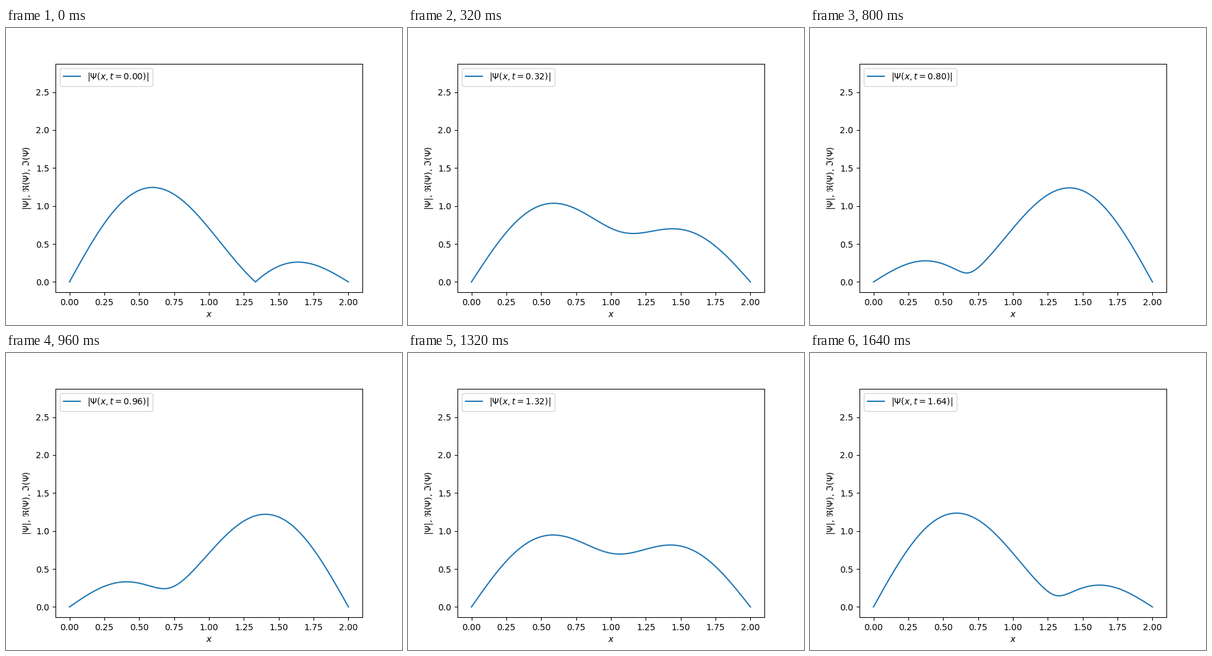
Animation of 640 by 480 pixels, one loop 1.68 s. Source, as a matplotlib script:

```python
import numpy as np
import matplotlib.pyplot as plt
from matplotlib.animation import FuncAnimation

LENGTH = 2.0
DT = 0.04
FRAMES = 42

x = np.linspace(0, LENGTH, 601)


def state(n):
    """Normalised eigenfunction of the infinite well."""
    return np.sqrt(2 / LENGTH) * np.sin(n * np.pi * x / LENGTH)


def step_phase(n):
    """Phase gained by level n in one Crank-Nicolson time step."""
    energy = (n * np.pi / LENGTH) ** 2 / 2
    return 2 * np.arctan(energy * DT / 2)


def psi(step):
    return sum(state(n) * np.exp(-1j * step_phase(n) * step)
               for n in (1, 2)) / np.sqrt(2)


def label(step):
    return rf"$|\Psi(x,t={step * DT:.2f})|$"


fig, ax = plt.subplots(figsize=(6.4, 4.8), dpi=100)
line, = ax.plot(x, np.abs(psi(0)), color="C0", lw=1.5, label=label(0))
top = 2.2 * np.abs(psi(0)).max()
ax.set_xlim(-0.05 * LENGTH, 1.05 * LENGTH)
ax.set_ylim(-0.05 * top, 1.05 * top)
ax.set_xlabel(r"$x$")
ax.set_ylabel(r"$|\Psi|$, $\Re(\Psi)$, $\Im(\Psi)$")
legend_text = ax.legend(loc="upper left").get_texts()[0]


def update(step):
    line.set_ydata(np.abs(psi(step)))
    legend_text.set_text(label(step))
    return line, legend_text


anim = FuncAnimation(fig, update, frames=FRAMES, interval=1000 * DT,
                     repeat=True, repeat_delay=0, blit=False)
plt.show()
```
